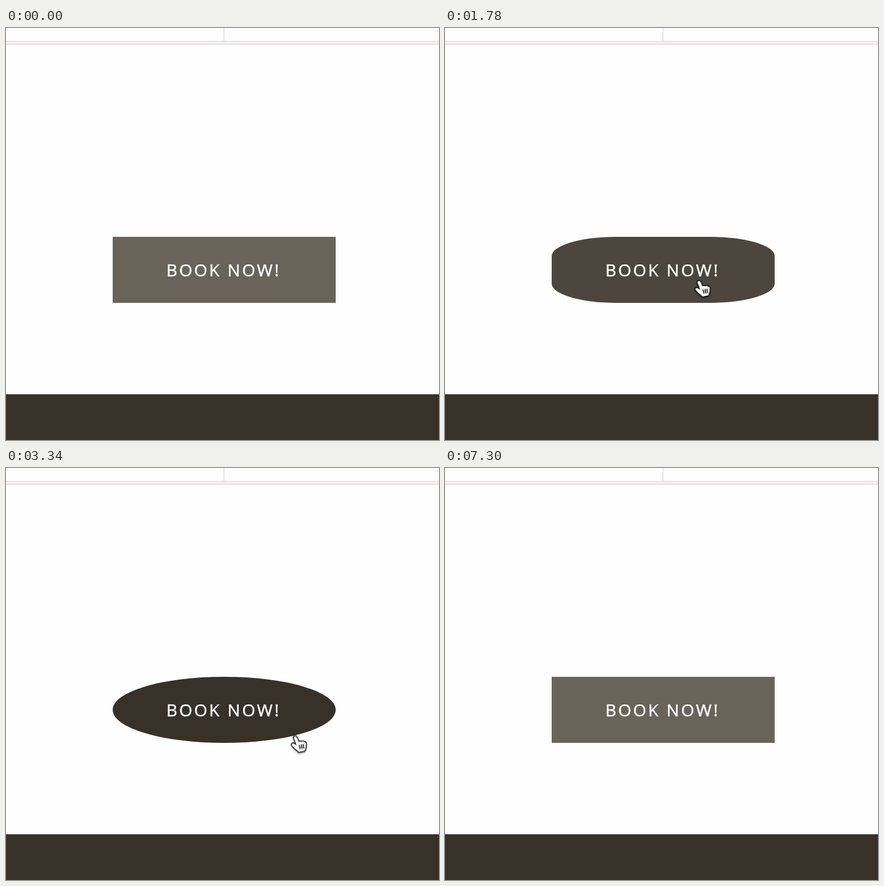
Animation, 767 px wide and 730 px high, one loop 8 s. Source, as an HTML page:

```html
<!DOCTYPE html>
<html lang="en">
<head>
<meta charset="utf-8">
<title>Booking button</title>
<style>
html, body { margin: 0; width: 100%; height: 100%; overflow: hidden; background: #fefefe; }
.stage { position: relative; width: 767px; height: 730px; overflow: hidden; }
.stage > * { position: absolute; }
.lines { left: 0; top: 0; fill: #e8e4e0; }
.footer { left: 0; top: 648.5px; width: 767px; height: 82px; background: #38312a; will-change: transform; }
.button {
  left: 189px; top: 369.5px; width: 394.5px; height: 117.5px;
  background: #6a635a;
  animation: hover 8s infinite;
}
.label {
  left: 284px; top: 408px;
  font: 30px/41px "Open Sans", sans-serif;
  letter-spacing: 3.2px; white-space: pre; color: #fff;
  -webkit-text-stroke: .5px #fff;
}
.cursor {
  left: 0; top: 0; width: 1px; height: 1px; overflow: visible;
  filter: drop-shadow(0 2px 1.5px rgba(0, 0, 0, .35));
  animation: travel 8s linear infinite;
}
.arrow { fill: #000; stroke: #fff; stroke-width: 3.6; paint-order: stroke; animation: arrow 8s step-end infinite; }
.hand { fill: #fff; stroke: #000; stroke-width: 1.7; stroke-linejoin: round; stroke-linecap: round; animation: hand 8s step-end infinite; }
.palm { stroke-width: 3; paint-order: stroke; }

/* The pointer is over the button from 18.9% to 42.2%. */
@keyframes hover {
  0%, 18.9% { background: #6a635a; border-radius: 0; animation-timing-function: ease; }
  28.9%, 42.2% { background: #38312a; border-radius: 50%; animation-timing-function: ease; }
  52.2%, 100% { background: #6a635a; border-radius: 0; }
}
@keyframes arrow { 0%, 42.2% { opacity: 1; } 18.9% { opacity: 0; } }
@keyframes hand { 0%, 42.2% { opacity: 0; } 18.9% { opacity: 1; } }
@keyframes travel {
  0% { transform: translate(800px, 665px); animation-timing-function: step-end; }
  11.75% { transform: translate(766px, 662px); animation-timing-function: cubic-bezier(.3, .36, .65, .74); }
  16.25% { transform: translate(563px, 547px); animation-timing-function: cubic-bezier(.3, .38, .65, .75); }
  18.9% { transform: translate(496px, 487px); animation-timing-function: cubic-bezier(.3, .45, .6, .9); }
  22.25% { transform: translate(448.5px, 449px); animation-timing-function: ease-out; }
  28.25% { transform: translate(447.5px, 448px); }
  30.5%, 40% { transform: translate(447px, 448px); animation-timing-function: cubic-bezier(.4, .15, .75, .65); }
  42.2% { transform: translate(535px, 487px); }
  44.75% { transform: translate(672px, 564px); }
  47.2% { transform: translate(769px, 607px); }
  47.5%, 100% { transform: translate(800px, 612px); }
}
</style>
</head>
<body>
<div class="stage">
  <svg class="lines" width="767" height="31">
    <rect x="385.2" width="1.8" height="23"/>
    <rect y="22.7" width="767" height="2.8"/>
    <rect y="27.3" width="767" height="2.8"/>
  </svg>
  <div class="footer"></div>
  <div class="button"></div>
  <div class="label">BOOK NOW!</div>
  <svg class="cursor">
    <path class="arrow" d="M0 0V22.4L5 17.8L8.6 26.6L12.3 25L8.7 16.3H15.2Z"/>
    <g class="hand" transform="rotate(-6)">
      <path class="palm" d="M-1.3 2.2C-1.9 -1 2.8 -2 3.9 1.3L6.8 10.2C7.8 8.3 10.8 8.6 11.8 10.3C13.3 8.9 15.6 9.4 16.2 11.2C18.1 10.6 19.3 11.8 19.1 14L18.4 19C18 21.5 16.3 23 15.6 26.4L4.4 27.4C3.6 24.4 -.8 22.5 -3 18.6C-4 16.8 -5.8 15.4 -6.2 13.4C-6.5 11.2 -3.6 10.3 -1.8 12.1L2.2 15.4Z"/>
      <path d="M7.2 15.6L7.8 22M10.8 15.2L11.2 21.8M14.3 15L14.3 21.6"/>
    </g>
  </svg>
</div>
</body>
</html>
```
